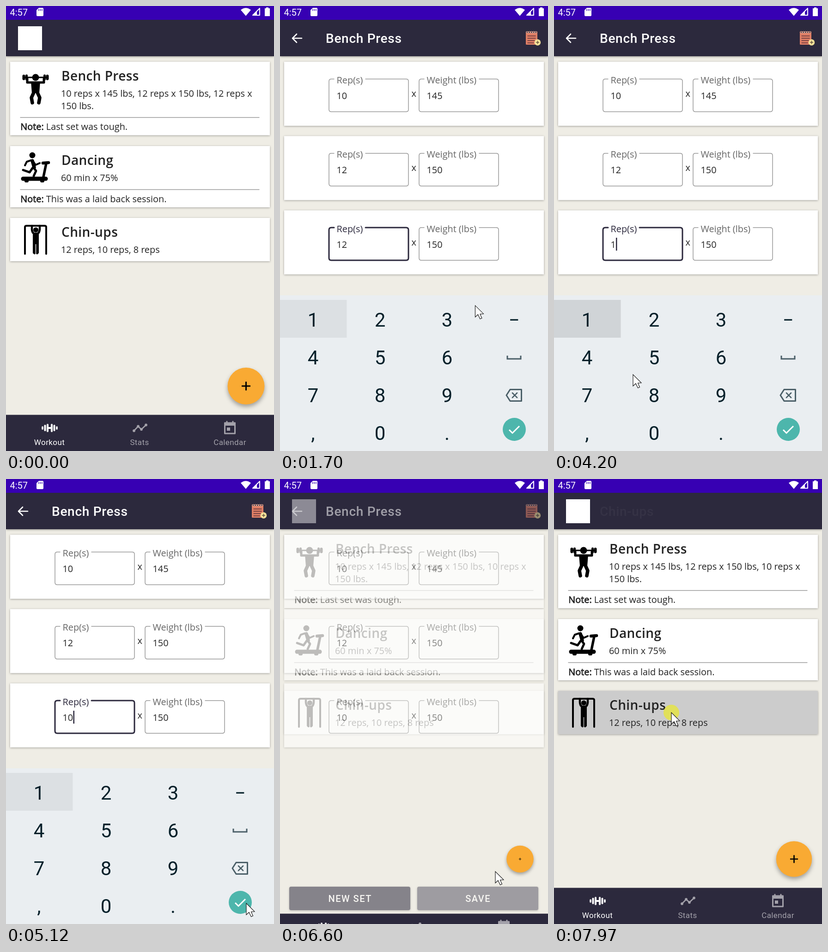
Animation, 580 px wide and 966 px high, one loop 8000 ms. Source, as an HTML page:

```html
<!DOCTYPE html>
<html lang="en">
<head>
<meta charset="utf-8">
<title>Workout journal</title>
<style>
  html, body { margin: 0; width: 100%; height: 100%; overflow: hidden; background: #efede5; }
  svg { display: block; }
  text { font-family: "Open Sans", sans-serif; font-size: 19.85px; fill: #222; white-space: pre; }
  .roboto { font-family: Roboto, sans-serif; font-size: 20px; }
  .name { font-size: 28px; font-weight: 600; letter-spacing: .4px; }
  .bold { stroke: #222; stroke-width: .8px; }
  .title { font-size: 28px; font-weight: 500; letter-spacing: .7px; fill: #fff; }
  .button { font-weight: 500; letter-spacing: 1.5px; fill: #fff; text-anchor: middle; }
  .tab { font-size: 17px; letter-spacing: .4px; fill: inherit; text-anchor: middle; }
  .key { font-size: 42px; fill: #06202a; text-anchor: middle; }
  .line { fill: none; stroke-linecap: round; stroke-linejoin: round; }
  .card { fill: #fff; filter: drop-shadow(0 1.5px 2px #0005); }
</style>
</head>
<body>
<svg id="stage" width="580" height="966" viewBox="0 0 580 966"></svg>
<script>
const LOOP = 8000, INK = '#2c293d', PAPER = '#efede5';

// Markup helpers
const rect = (x, y, w, h, fill, extra = '') =>
  `<rect x="${x}" y="${y}" width="${w}" height="${h}" fill="${fill}" ${extra}/>`;
const circle = (x, y, r, fill, extra = '') => `<circle cx="${x}" cy="${y}" r="${r}" fill="${fill}" ${extra}/>`;
const label = (x, y, str, cls = '', extra = '') => `<text x="${x}" y="${y}" class="${cls}" ${extra}>${str}</text>`;
const line = (d, color, width, extra = '') =>
  `<path class="line" d="${d}" stroke="${color}" stroke-width="${width}" ${extra}/>`;
const shape = (d, fill, extra = '') => `<path d="${d}" fill="${fill}" ${extra}/>`;
const group = (id, content, extra = '') => `<g id="${id}" ${extra}>${content}</g>`;
const card = (y, h) => rect(9, y, 562, h, '#fff', 'class="card"');
const rippleIn = (id, y, h) =>
  `<clipPath id="${id}Clip">${rect(9, y, 562, h, '#000')}</clipPath>
   <g clip-path="url(#${id}Clip)">${circle(290, y + h / 2, 0, '#000', `id="${id}" opacity=".2"`)}</g>`;
const note = (y, str) => line(`M31 ${y - 27}H548`, '#999', 1.3) +
  `<text x="31.3" y="${y}"><tspan class="bold">Note:</tspan> ${str}</text>`;

const lifter = circle(64, 155, 7.5, '#000') +
  line('M40 155H88', '#000', 3) + line('M38.5 152V158M89.5 152V158', '#000', 6) +
  line('M44.5 151V159M83.5 151V159', '#000', 5) +
  line('M46 158V166H82V158', '#000', 5) + shape('M54 164H74L72 189H56Z', '#000') +
  line('M60 188L55 199L57 210M68 188L73 199L71 210', '#000', 7.5);

const runner = circle(57, 324, 6.5, '#000') + line('M57 336L61 350', '#000', 7.5) +
  line('M54 335L45 338L41 346M58 336L64 345L73 341', '#000', 4) +
  line('M58 351L51 361L37 356M60 351L65 358L60 369', '#000', 4.8) +
  line('M80 341L92 340', '#000', 6.5) + line('M87 342L81 371', '#000', 5.5) +
  line('M37 375H86', '#000', 9) + line('M43 380H46M77 380H80', '#000', 6);

const hanger = line('M41 538V480Q41 477 45 477H83Q87 477 87 480V538', '#000', 4) +
  circle(64.5, 486, 5.5, '#000') + line('M56 477V485Q57 495 64.5 495Q72 495 73 485V477', '#000', 4.5) +
  shape('M58 492H71V536Q68 541 65.2 538V517H63.8V538Q61 541 58 536Z', '#000');

const list = card(121, 159.5) + card(304, 133) + card(460, 94) +
  rippleIn('benchRipple', 121, 159.5) + rippleIn('chinRipple', 460, 94) +
  lifter + label(120, 162, 'Bench Press', 'name') +
  label(119, 197, '', '', 'id="summary"') + label(119, 224, '150 lbs.') + note(269, 'Last set was tough.') +
  runner + label(120, 345, 'Dancing', 'name') + label(119, 380, '60 min x 75%') +
  note(425.5, 'This was a laid back session.') +
  hanger + label(120, 501, 'Chin-ups', 'name') + label(119, 536, '12 reps, 10 reps, 8 reps');

// Outlined input with a notch in its top edge for the label
const outline = (x, y, notch) =>
  `M${x + 11} ${y}H${x + 5}Q${x} ${y} ${x} ${y + 5}V${y + 66}Q${x} ${y + 71} ${x + 5} ${y + 71}` +
  `H${x + 167}Q${x + 172} ${y + 71} ${x + 172} ${y + 66}V${y + 5}Q${x + 172} ${y} ${x + 167} ${y}H${x + notch}`;
const field = (x, y, name, value, notch, id) =>
  line(outline(x, y, notch), '#999', 1.5, `id="${id}Box"`) +
  label(x + 16.5, y + 9.5, name, 'float', `id="${id}Label" style="fill:#666"`) +
  label(x + 16.5, y + 43.5, value, '', `id="${id}Value"`);
const setRow = (reps, weight, i) => {
  const y = 121 + i * 161.3;
  return card(y, 139) + field(106, y + 37.5, 'Rep(s)', reps, 79, 'reps' + i) +
    label(284.5, y + 76, 'x') + field(301, y + 37.5, 'Weight (lbs)', weight, 130, 'weight' + i);
};
const button = (x, str) => rect(x, 885, 262, 51, INK, 'rx="4" style="filter:drop-shadow(0 1.5px 2px #0006)"') +
  label(x + 131.7, 918, str, 'roboto button');
const edit = rect(0, 109, 580, 857, PAPER, 'id="editPaper"') +
  [[10, 145], [12, 150], [12, 150]].map(([r, w], i) => setRow(r, w, i)).join('') +
  rect(134, 503, 2.5, 28, INK, 'id="caret"') + button(20, 'NEW SET') + button(297, 'SAVE') +
  rect(297, 885, 262, 51, '#fff', 'rx="4" id="saveGlow" opacity=".22"');

const tabs = rect(0, 887.5, 580, 90, INK) +
  `<g fill="#fff">${label(94, 953, 'Workout', 'roboto tab')}</g>` +
  line('M79 914V918M110 914V918', '#fff', 3.5) + line('M84.5 911V921M104.5 911V921', '#fff', 4) +
  line('M90 909V923M99 909V923', '#fff', 4) + line('M90 916H99', '#fff', 4) +
  `<g fill="#a3a1aa">${label(289, 953, 'Stats', 'roboto tab')}${label(484.5, 953, 'Calendar', 'roboto tab')}</g>` +
  line('M277 922L286 912.5L293 919L303 909.5', '#a3a1aa', 2.6) +
  [[277, 922], [286, 912.5], [293, 919], [303, 909.5]].map(([x, y]) => circle(x, y, 2.9, '#a3a1aa')).join('') +
  line('M473.5 905H495.5V928H473.5Z', '#a3a1aa', 3) + rect(472, 904, 25, 7, '#a3a1aa') +
  line('M478 902V905M491 902V905', '#a3a1aa', 3) + rect(478, 915, 7, 7, '#a3a1aa');

const keyRows = [['1', '2', '3', '−'], ['4', '5', '6', ''], ['7', '8', '9', ''], [',', '0', '.', '']];
const keyboard = rect(0, 628, 580, 640, '#eaeef1') +
  rect(0, 638, 144.5, 82, '#000', 'id="oneKey"') +
  rect(434.5, 803, 144.5, 82, '#000', 'id="deleteKey" opacity=".08"') +
  rect(145, 885, 144.5, 81, '#000', 'id="zeroKey" opacity=".08"') +
  keyRows.map((row, r) => row.map((k, c) =>
    label(71.5 + c * 145, 695.5 + r * 82.3, k, 'roboto key')).join('')).join('') +
  line('M492 759V766H521V759', '#4b5f68', 3, 'style="stroke-linecap:butt;stroke-linejoin:miter"') +
  line('M498 832.5H522.5V857.5H498L490 845Z', '#4b5f68', 3) + line('M503 840L513 850M513 840L503 850', '#4b5f68', 2.6) +
  circle(507, 919, 50, '#000', 'id="doneGlow" opacity=".08"') + circle(507, 919, 25, '#4db6ac') +
  line('M496 920L503 927L518 912', '#fff', 3, 'style="stroke-linecap:butt;stroke-linejoin:miter"');

const notepad = rect(532, 55, 25, 29, '#df7f66', 'rx="1.5"') +
  line('M536 65H553M536 70H553M536 75H551M536 80H549', '#5b3038', 1.4) +
  [0, 1, 2, 3, 4].map(i => circle(535 + i * 4.7, 57, 1.9, INK, 'stroke="#e9b9a5" stroke-width="1"')).join('') +
  circle(557.5, 79, 6.7, '#f6e39a') + line('M554.5 79H560.5M557.5 76V82', '#5b4a3a', 1.4);

const bars = rect(0, 30, 580, 79, INK, 'style="filter:drop-shadow(0 1px 2px #0006)"') +
  rect(0, 0, 580, 30, '#3700b3') + label(8.5, 21, '4:57', 'roboto', 'style="fill:#fff"') +
  shape('M71 4H79Q81 4 81 6V20Q81 22 79 22H68Q66 22 66 20V9Z', '#fff') +
  line('M71 7V10M74.5 7V10M78 7V10', '#3700b3', 1.4) +
  shape('M508 8.5Q519 0 530 8.5L519 21.5Z', '#fff') +
  line('M549 5V20H534Z', '#fff', 2) + shape('M534 20L543 11V20Z', '#fff') +
  shape('M563 5V3H568V5H571V22H560V5Z', '#fff') +
  group('logo', rect(26, 44, 52, 52, '#fff')) +
  group('heading', line('M47 70H28M36 61L27 70L36 79', '#fff', 2.6) +
    label(99, 80, 'Bench Press', 'roboto title') + notepad) +
  label(99, 80, 'Chin-ups', 'roboto title', 'id="nextTitle"');

const fab = circle(0, 0, 40, '#f9aa33', 'style="filter:drop-shadow(0 5px 5px #0005)"') +
  line('M-9.5 0H9.5M0 -9.5V9.5', '#000', 3, 'id="plus" style="stroke-linecap:butt"');

const pointer = circle(0, 0, 17, '#e9e82f', 'id="press" opacity=".72"') +
  shape('M0 0V25L6 19.5L10.5 29L14.5 27.5L10.5 18.5L18 18Z', '#fff', 'stroke="#111" stroke-width="1.1"');

document.getElementById('stage').innerHTML = rect(0, 0, 580, 966, PAPER) +
  group('list', list) + group('edit', edit) + group('fab', fab) + group('tabs', tabs) +
  group('keyboard', keyboard) + bars + group('pointer', pointer);

// Motion helpers
const $ = id => document.getElementById(id);
const set = (id, attrs) => { for (const k in attrs) $(id).setAttribute(k, attrs[k]); };
const show = (id, on) => set(id, { visibility: on ? 'inherit' : 'hidden' });
const fade = (id, opacity) => set(id, { opacity, visibility: opacity > 0 ? 'inherit' : 'hidden' });
const shift = (id, y) => set(id, { transform: `translate(0 ${y})` });
const ramp = (t, a, b) => Math.min(1, Math.max(0, (t - a) / (b - a)));
const easeOut = (p, n = 2) => 1 - (1 - p) ** n;
const within = (t, a, b) => t >= a && t < b;

// Pointer stops: time, x, y
const path = [
  [360, 310, 316], [800, 345, 240], [1180, 345, 240], [1280, 297, 307], [1980, 490, 835],
  [2200, 505, 846], [2700, 505, 846], [2820, 491, 850], [3000, 491, 850], [3720, 85, 690],
  [3840, 85, 690], [4200, 171, 800], [4600, 204, 915], [4850, 204, 915], [5120, 520, 921],
  [5640, 520, 921], [5810, 517, 893], [6150, 445, 906], [6470, 445, 906], [6600, 466, 852],
  [7270, 258, 552], [7440, 254, 507], [8000, 254, 507]
];
const presses = [[950, 1180], [2480, 2770], [4690, 4900], [5290, 5450], [6220, 6480], [7470, 8000]];
const edits = [1200, 2710, 4770];

function pointerAt(t) {
  const i = Math.max(1, path.findIndex(stop => stop[0] > t));
  const [t0, x0, y0] = path[i - 1], [t1, x1, y1] = path[i];
  const p = ramp(t, t0, t1), s = p * p * (3 - 2 * p);
  return [x0 + (x1 - x0) * s, y0 + (y1 - y0) * s];
}

function ripple(id, t, start, duration, fromX) {
  const p = easeOut(ramp(t, start, start + duration));
  set(id, { cx: fromX + (290 - fromX) * p, r: 286 * p });
}

function draw(t) {
  const leaving = t > 6000;
  const editAlpha = leaving ? 1 - ramp(t, 6510, 6710) : ramp(t, 1180, 1350);

  fade('list', leaving ? ramp(t, 6500, 6690) : 1 - ramp(t, 1250, 1420));
  $('summary').textContent = `10 reps x 145 lbs, 12 reps x 150 lbs, ${leaving ? 10 : 12} reps x`;
  ripple('benchRipple', leaving ? 0 : t, 1040, 265, 345);
  ripple('chinRipple', t, 7680, 240, 254);

  fade('edit', editAlpha);
  show('editPaper', !leaving);
  const drop = 22 * (1 - easeOut(ramp(t, 1180, 1430)));
  document.querySelectorAll('.float').forEach(el => el.setAttribute('transform', `translate(0 ${drop})`));
  const focused = t < 6350;
  set('reps2Box', { stroke: focused ? INK : '#999', 'stroke-width': focused ? 3 : 1.5 });
  $('reps2Label').style.fill = focused ? INK : '#666';
  const reps = t < edits[1] ? '12' : t < edits[2] ? '1' : '10';
  $('reps2Value').textContent = reps;
  const lastEdit = edits.filter(e => e <= t).pop() ?? 0;
  set('caret', { x: reps.length > 1 ? 145.5 : 134 });
  show('caret', focused && (t - lastEdit) % 1000 < 500);
  show('saveGlow', within(t, 6270, 6740));

  fade('logo', 1 - editAlpha);
  fade('heading', editAlpha);
  fade('nextTitle', .04 * ramp(t, 7940, 7970));

  shift('tabs', leaving ? 78 * (1 - easeOut(ramp(t, 6566, 6796))) : 78 * ramp(t, 1180, 1410) ** 2);
  const scale = t > 7700 ? 1 - ramp(t, 7955, 8045) ** 2
    : leaving ? easeOut(ramp(t, 6537, 6717), 3) : 1 - ramp(t, 1180, 1270) ** 2;
  set('fab', { transform: `translate(519.5 825) scale(${scale})` });
  set('plus', { transform: `scale(${Math.max(0, (scale - .55) / .45)})` });
  show('fab', scale > 0);

  const rise = ramp(t, 1200, 1360), fall = ramp(t, 5700, 5900);
  fade('keyboard', rise * (1 - fall));
  shift('keyboard', 203 * (1 - rise) + 84 * fall);
  set('oneKey', { opacity: within(t, 3650, 4350) ? .11 : .06 });
  show('deleteKey', within(t, 2500, 2760));
  show('zeroKey', within(t, 4710, 4900));
  show('doneGlow', within(t, 5300, 5440));

  show('pointer', t >= 360);
  set('pointer', { transform: `translate(${pointerAt(t)})` });
  show('press', t >= 360 && presses.some(([a, b]) => within(t, a, b)));
}

function tick() {
  draw(performance.now() % LOOP);
  requestAnimationFrame(tick);
}
tick();
</script>
</body>
</html>
```
